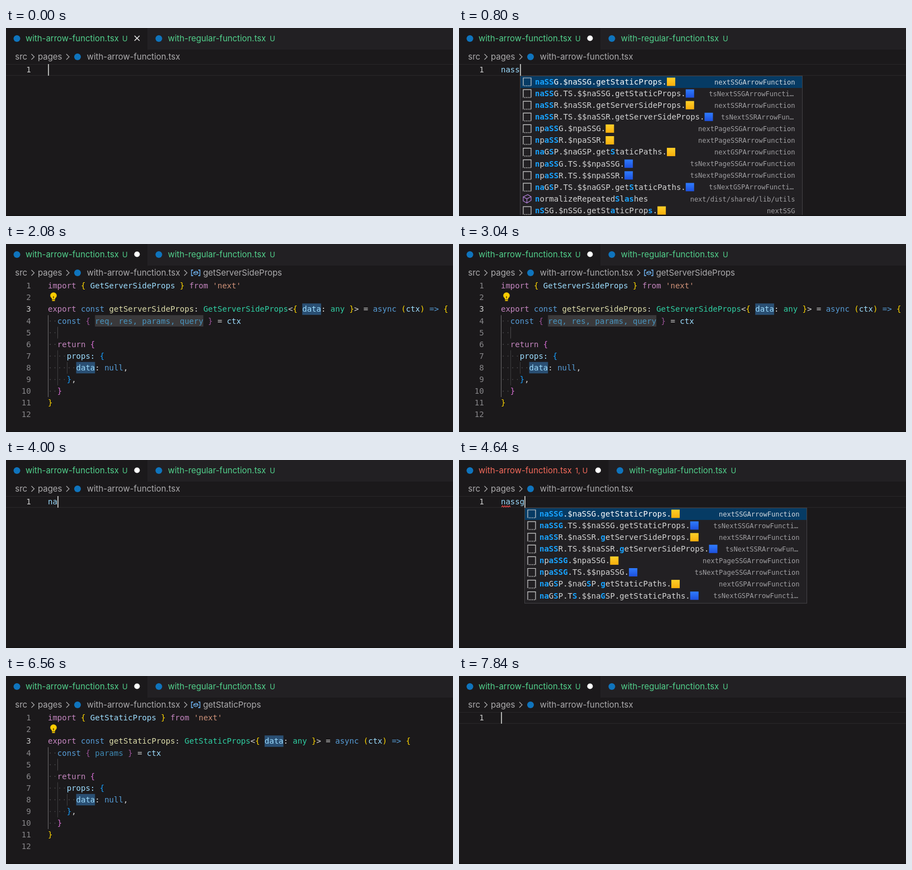
Animation, 800 px wide and 339 px high, one loop 8 s. Source, as an HTML page with a canvas:

```html
<!DOCTYPE html>
<html lang="en">
<head>
<meta charset="utf-8">
<title>Snippet demo</title>
<style>
html, body { margin: 0; width: 100%; height: 100%; overflow: hidden; background: #1b191b; }
canvas { display: block; width: 100vw; height: 100vh; }
</style>
</head>
<body>
<canvas id="stage" width="800" height="339"></canvas>
<script>
const g = document.getElementById('stage').getContext('2d');
const LOOP = 8000;
const LEFT = 75, TOP = 65, ROW = 21.1, CHAR = 8.43;
const MONO = '"DejaVu Sans Mono", monospace';
const UI = 'Inter, sans-serif';
const COLOR = {
  bg: '#1b191b', bar: '#222023', text: '#d4d4d4', crumb: '#adacae',
  green: '#52d18c', red: '#f46a5b', icon: '#0f74bd',
  pink: '#c586c0', blue: '#569cd6', sky: '#9cdcfe', fn: '#dcdcaa',
  type: '#2fcfa3', str: '#ce9178', name: '#4fc1ff',
  b1: '#ffd700', b2: '#da70d6', b3: '#179fff', mark: '#2a4f73'
};

function rect(x, y, w, h, fill) {
  g.fillStyle = fill;
  g.fillRect(x, y, w, h);
}

function disc(x, y, r, fill) {
  g.fillStyle = fill;
  g.beginPath();
  g.arc(x, y, r, 0, Math.PI * 2);
  g.fill();
}

function line(points, color, width = 1) {
  g.strokeStyle = color;
  g.lineWidth = width;
  g.beginPath();
  points.forEach(([x, y]) => g.lineTo(x, y));
  g.stroke();
}

function text(str, x, y, font, fill, align = 'left') {
  g.font = font;
  g.fillStyle = fill;
  g.textAlign = align;
  g.fillText(str, x, y);
}

const label = (str, x, y, fill, size = 14.95) => text(str, x, y, `${size}px ${UI}`, fill);
const mono = (str, x, y, fill, bold = '') => text(str, x, y, `${bold} 14px ${MONO}`, fill);
const colX = col => LEFT + col * CHAR;
const rowY = row => TOP + row * ROW;
const baseline = row => rowY(row) + 15.2;

function cursor(col, row) {
  rect(Math.round(colX(col)), Math.round(rowY(row)), 2, 21, '#aeafad');
}

function lineNumber(row, active) {
  text(row + 1, 44.7, baseline(row), `14px ${MONO}`, active ? '#cfcfcf' : '#88878a', 'right');
}

function tabs(dirty, error) {
  const shift = error ? 14.5 : 0;
  rect(0, 0, 800, 39, COLOR.bar);
  rect(0, 0, 253 + shift, 39, COLOR.bg);
  const tint = error ? COLOR.red : COLOR.green;
  disc(19.5, 19, 6, COLOR.icon);
  label('with-arrow-function.tsx', 35, 24, tint);
  label(error ? '1, U' : 'U', 208, 23.5, tint, 13);
  const x = 234.5 + shift;
  if (dirty) disc(x, 18.5, 5, '#fff');
  else {
    line([[x - 4.5, 14], [x + 4.5, 23]], '#eee', 1.4);
    line([[x + 4.5, 14], [x - 4.5, 23]], '#eee', 1.4);
  }
  disc(273.5 + shift, 19, 6, COLOR.icon);
  label('with-regular-function.tsx', 289.7 + shift, 24, COLOR.green);
  label('U', 472 + shift, 23.5, COLOR.green, 13);
}

function chevron(x) {
  line([[x - 2.5, 47], [x + 2.5, 52], [x - 2.5, 57]], COLOR.crumb, 1.2);
}

function crumbs(symbol) {
  label('src', 16.3, 57, COLOR.crumb);
  chevron(48);
  label('pages', 57, 57, COLOR.crumb);
  chevron(110.5);
  disc(128, 52, 6, COLOR.icon);
  label('with-arrow-function.tsx', 144.7, 57, COLOR.crumb);
  if (!symbol) return;
  chevron(321.5);
  const blue = '#75beff';
  line([[335, 47], [332, 47], [332, 57], [335, 57]], blue, 1.3);
  line([[344, 47], [347, 47], [347, 57], [344, 57]], blue, 1.3);
  line([[336, 51], [340, 49], [343.5, 50.5], [343.5, 53.5], [339.5, 55.5], [336, 54], [336, 51], [339.5, 52.5], [343.5, 50.5]], blue, 1.1);
  label(symbol, 352.7, 57, COLOR.crumb);
}

// Suggestion rows: label, square colour, detail, optional matched positions
const Y = 'yellow', B = 'blue';
const item = (name, kind, detail, hits) => ({ name, kind, detail, hits });
const ssg = [
  item('naSSG.$naSSG.getStaticProps.', Y, 'nextSSGArrowFunction'),
  item('naSSG.TS.$$naSSG.getStaticProps.', B, 'tsNextSSGArrowFuncti…')
];
const ssr = [
  item('naSSR.$naSSR.getServerSideProps.', Y, 'nextSSRArrowFunction'),
  item('naSSR.TS.$$naSSR.getServerSideProps.', B, 'tsNextSSRArrowFun…')
];
const page = k => [
  item(`npaSS${k}.$npaSS${k}.`, Y, `nextPageSS${k}ArrowFunction`),
  item(`npaSS${k}.TS.$$npaSS${k}.`, B, `tsNextPageSS${k}ArrowFunction`)
];
const [pg, pgTs] = page('G'), [pr, prTs] = page('R');
const paths = (a, b) => [
  item('naGSP.$naGSP.getStaticPaths.', Y, 'nextGSPArrowFunction', a),
  item('naGSP.TS.$$naGSP.getStaticPaths.', B, 'tsNextGSPArrowFuncti…', b)
];
const [gsp, gspTs] = paths([0, 1, 3, 16], [0, 1, 3, 20]);
const broad = [
  ...ssg, ...ssr, pg, pr, gsp, pgTs, prTs, gspTs,
  item('normalizeRepeatedSlashes', '', 'next/dist/shared/lib/utils', [0, 17, 19, 20]),
  item('nSSG.$nSSG.getStaticProps.', Y, 'nextSSG', [0, 1, 16, 24])
];
const LISTS = {
  nas: broad,
  nass: broad,
  nassr: [...ssr, pr, prTs, ...ssg],
  nassg: [...ssg, ...ssr, pg, pgTs, ...paths()]
};

function matches(name, query) {
  const low = name.toLowerCase();
  let from = 0;
  return [...query].map(c => {
    const at = low.indexOf(c, from);
    if (at >= 0) from = at + 1;
    return at;
  });
}

function square(x, y, kind) {
  const fill = g.createLinearGradient(x, y, x, y + 15);
  const [a, b] = kind === Y ? ['#ffd029', '#f7ae0c'] : ['#2f7cff', '#1d50dc'];
  fill.addColorStop(0, a);
  fill.addColorStop(1, b);
  rect(x, y, 15, 15, fill);
}

function snippetIcon(x, y) {
  line([[x, y + 15], [x, y + 0.5], [x + 14, y + 0.5], [x + 14, y + 15]], '#d0d0d0', 1.2);
  for (let i = 2; i < 14; i += 3) rect(x + i, y + 14, 1.5, 1.5, '#d0d0d0');
}

function cubeIcon(x, y) {
  const c = '#b180d7';
  line([[x, y + 4], [x + 8, y], [x + 14, y + 3.5], [x + 14, y + 10.5], [x + 6.5, y + 15], [x, y + 11.5], [x, y + 4], [x + 6.5, y + 7.5], [x + 14, y + 3.5]], c, 1.2);
  line([[x + 6.5, y + 7.5], [x + 6.5, y + 15]], c, 1.2);
}

function popup(query) {
  const list = LISTS[query];
  const x = Math.round(colX(query.length)) + 0.5;
  const h = list.length * ROW + 3;
  rect(x, 86.5, 505, h, '#222023');
  rect(x, 87, 505, ROW, '#063b64');
  list.forEach(({ name, kind, detail, hits }, i) => {
    const y = 86.5 + i * ROW, base = y + 15.3, left = x + 26.5;
    if (kind) snippetIcon(x + 5.5, y + 3);
    else cubeIcon(x + 5.5, y + 3);
    const on = new Set(hits || matches(name, query));
    [...name].forEach((c, n) => {
      const hit = on.has(n);
      mono(c, left + n * CHAR, base, hit ? '#18a3ff' : i ? COLOR.text : '#fff', hit ? 'bold' : '');
    });
    if (kind) square(left + name.length * CHAR, y + 3, kind);
    const end = x + (detail.endsWith('…') ? 489.5 : 492);
    text(detail, end, base - 0.3, `12px ${MONO}`, i ? '#a09fa2' : '#d2d8de', 'right');
  });
  g.strokeStyle = '#434145';
  g.lineWidth = 1;
  g.strokeRect(x, 86.5, 505, h);
}

function source(name, vars) {
  const C = COLOR, type = name[0].toUpperCase() + name.slice(1);
  return [
    [['import ', C.pink], ['{ ', C.b1], [type, C.sky], [' } ', C.b1], ['from ', C.pink], ["'next'", C.str]],
    [],
    [['export ', C.pink], ['const ', C.blue], [name, C.fn], [': ', C.text], [type, C.type], ['<', C.text], ['{ ', C.b1],
      ['data', C.sky, 'mark'], [': ', C.text], ['any', C.type], [' }', C.b1], ['> = ', C.text], ['async ', C.blue],
      ['(', C.b1], ['ctx', C.sky], [') ', C.b1], ['=> ', C.blue], ['{', C.b1]],
    [['  const ', C.blue], ['{ ', C.b2, 'dim'], [vars, C.name, vars.includes(',') ? 'box' : 'dim'], [' } ', C.b2, 'dim'], ['= ', C.text], ['ctx', C.sky]],
    [['  ', C.text]],
    [['  return ', C.pink], ['{', C.b2]],
    [['    props: ', C.sky], ['{', C.b3]],
    [['      ', C.text], ['data', C.sky, 'mark'], [': ', C.text], ['null', C.blue], [',', C.text]],
    [['    }', C.b3], [',', C.text]],
    [['  }', C.b2]],
    [['}', C.b1]],
    []
  ];
}

const CODE = {
  nassr: source('getServerSideProps', 'req, res, params, query'),
  nassg: source('getStaticProps', 'params')
};

function bulb(x, y) {
  disc(x, y - 2, 5.8, '#ffcc00');
  rect(x - 3, y + 1, 6, 4, '#ffcc00');
  rect(x - 2.5, y + 5.8, 5, 2, '#ffcc00');
  rect(x - 1, y - 1, 2, 4, '#8a6d00');
}

function guide(col, first, last, color) {
  rect(Math.round(colX(col)), rowY(first), 1, (last - first + 1) * ROW, color);
}

function code(lines, checked, all) {
  lines.forEach((parts, row) => {
    const str = parts.map(p => p[0]).join('');
    if (all && row < 11) rect(LEFT, rowY(row), (str.length + 1) * CHAR, ROW, '#264f78');
    let col = 0;
    for (const [s, color, style] of parts) {
      const x = colX(col), w = s.length * CHAR;
      if (!all && style === 'mark') rect(x, rowY(row), w, ROW - 0.5, COLOR.mark);
      if (!all && style === 'box') rect(x, rowY(row), w, ROW - 0.5, '#3a393b');
      g.globalAlpha = checked && (style === 'dim' || style === 'box') ? 0.67 : 1;
      mono(s, x, baseline(row), color);
      g.globalAlpha = 1;
      col += s.length;
    }
    const indent = str.length - str.trimStart().length;
    for (let i = 0; i < indent; i++) disc(colX(i + 0.5), rowY(row) + 10.5, 0.9, '#4a494c');
    lineNumber(row, row === (all ? 11 : 2));
  });
  guide(0, 3, 9, '#6c6b6d');
  guide(2, 4, 4, '#4a494b');
  guide(2, 6, 8, '#3e3d3f');
  guide(4, 7, 7, '#3e3d3f');
  if (all) cursor(0, 11);
  else if (checked) bulb(85, 95);
}

function entry(word, squiggle, caret) {
  rect(0, 65, 800, 1, '#292729');
  rect(0, 85, 800, 1, '#292729');
  lineNumber(0, true);
  mono(word, LEFT, baseline(0), COLOR.sky);
  if (squiggle) {
    const wave = Array.from({ length: 9 }, (_, i) => [76 + i * 2, i % 2 ? 82.5 : 85]);
    line(wave, '#f14c4c', 1.2);
  }
  if (LISTS[word]) popup(word);
  if (caret) cursor(word.length, 0);
}

// Each take types a word, accepts the snippet, then selects all and clears it
const TAKES = [
  { word: 'nassr', name: 'getServerSideProps', type: 480, insert: 1600, select: 3360 },
  { word: 'nassg', name: 'getStaticProps', type: 4000, insert: 5440, select: 7200 }
];

function draw(t) {
  const take = TAKES[t < 3840 ? 0 : 1];
  const { word, name, type, insert, select } = take;
  const clear = select + 160;
  const typed = t < type || t >= clear ? 0 : Math.min(word.length, 2 + Math.floor((t - type) / 160));
  const checked = t >= insert + 320;
  const error = t >= type + 640 && !checked;
  rect(0, 0, 800, 339, COLOR.bg);
  tabs(t >= TAKES[0].type, error);
  crumbs(checked && t < clear + 160 ? name : '');
  if (t >= insert && t < clear) code(CODE[word], checked, t >= select);
  else entry(word.slice(0, typed), error, !typed || t < type + 1120);
  rect(0, 337, 800, 2, '#151415');
}

function frame(now) {
  draw(now % LOOP);
  requestAnimationFrame(frame);
}
requestAnimationFrame(frame);
</script>
</body>
</html>
```
